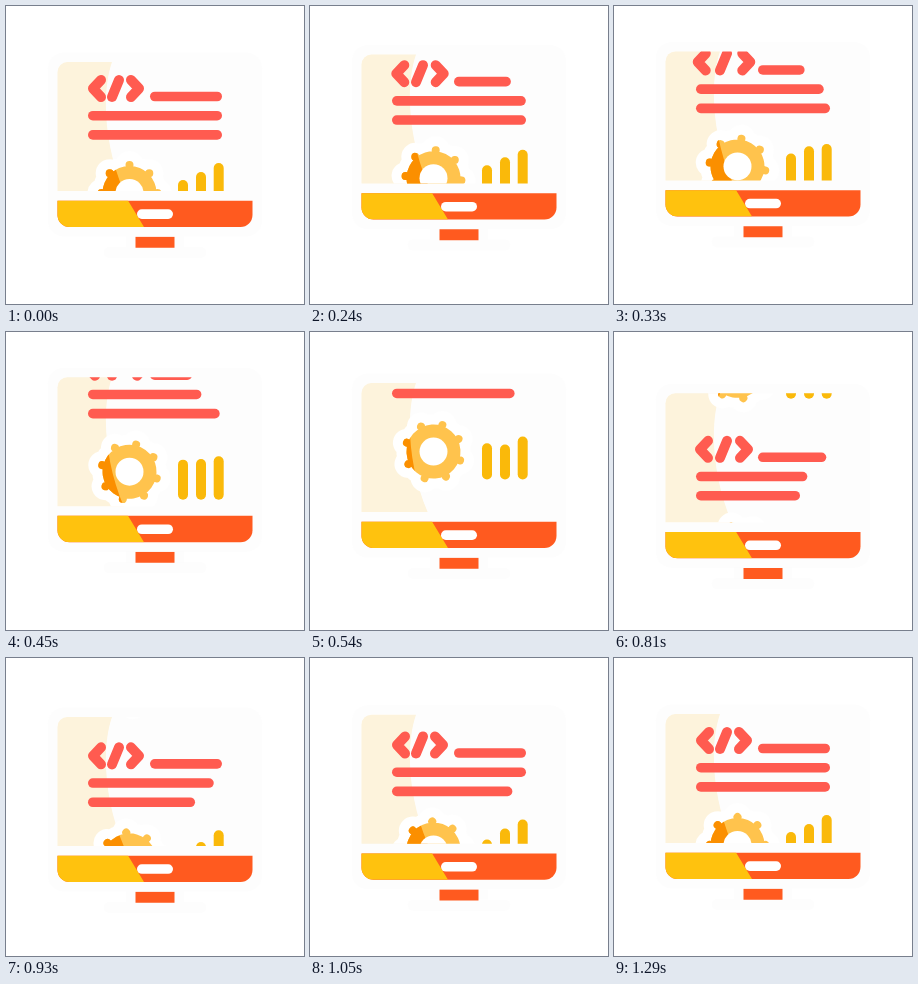
Recreate the animation shown at these times as an HTML page with a canvas. Size 298 by 298 pixels, loop 1470 ms.

```html
<!DOCTYPE html>
<html>
<head>
<meta charset="utf-8">
<style>
html, body { margin: 0; width: 100%; height: 100%; overflow: hidden; background: #fff; }
canvas { display: block; width: 298px; height: 298px; }
</style>
</head>
<body>
<canvas id="stage"></canvas>
<script>
const LOOP = 1470, SCROLL = 183;
const canvas = document.getElementById('stage');
const ctx = canvas.getContext('2d');
const ratio = window.devicePixelRatio || 1;
canvas.width = canvas.height = 298 * ratio;

const FRAME = '#fdfdfd', CREAM = '#fdf3dc', YELLOW = '#ffc20e', ORANGE = '#ff5a1f';
const RED = '#ff5b50', GOLD = '#ffc34d', DARK_GOLD = '#fb8f00', AMBER = '#fab90a';

// 0 to 1 with soft ends, from time a to time b
function ramp(t, a, b) {
  const u = Math.min(1, Math.max(0, (t - a) / (b - a)));
  return u * u * (3 - 2 * u);
}

// 0 to 1 and back again
const pulse = (t, up, down, length) => ramp(t, up, up + length) - ramp(t, down, down + length);

// cubic-bezier(.64, 0, .36, 1)
function easeInOut(x) {
  let lo = 0, hi = 1, s = 0.5;
  for (let i = 0; i < 20; i++) {
    s = (lo + hi) / 2;
    const r = 1 - s;
    if (1.92 * s * r * r + 1.08 * s * s * r + s * s * s < x) lo = s; else hi = s;
  }
  return s * s * (3 - 2 * s);
}

function box(x, y, w, h, radius, color) {
  ctx.fillStyle = color;
  ctx.beginPath();
  ctx.roundRect(x, y, w, h, radius);
  ctx.fill();
}

function stroke(...points) {
  ctx.beginPath();
  points.forEach(([x, y]) => ctx.lineTo(x, y));
  ctx.stroke();
}

const screen = new Path2D();
screen.roundRect(51.5, 56, 195, 129, [10, 10, 0, 0]);
const shade = new Path2D('M40 40H112L106 56C95 88 98 145 122 194.5L138 221H40Z');

const gear = new Path2D();
gear.arc(0, 0, 27, 0, 2 * Math.PI);
for (let i = 0; i < 8; i++) {
  const a = i * Math.PI / 4, x = 28 * Math.cos(a), y = 28 * Math.sin(a);
  gear.moveTo(x + 4, y);
  gear.arc(x, y, 4, 0, 2 * Math.PI);
}

function drawGear(t, y) {
  const placed = new Path2D();
  const angle = 45 * ramp(t, 0, 1230);
  placed.addPath(gear, new DOMMatrix().translate(123.5, y).rotate(angle));
  ctx.strokeStyle = '#fff';
  ctx.lineWidth = 20;
  ctx.stroke(placed);
  ctx.fillStyle = GOLD;
  ctx.fill(placed);
  ctx.save();
  ctx.clip(shade);
  ctx.fillStyle = DARK_GOLD;
  ctx.fill(placed);
  ctx.restore();
  box(109.5, y - 14, 28, 28, 14, '#fff');
}

function drawBars(t, y) {
  const bars = [[172, 41, 10, 395, 860], [190, 49, 15, 290, 710], [207.7, 58, 15, 180, 560]];
  for (const [x, full, shrink, up, down] of bars) {
    const h = full - shrink * pulse(t, up, down, 300);
    box(x, y - h, 10, h, 5, AMBER);
  }
}

function drawCode(t, y) {
  const spread = 6 * pulse(t, 180, 600, 285);
  ctx.strokeStyle = RED;
  ctx.lineWidth = 10;
  stroke([95 - spread, y - 8.5], [87 - spread, y], [95 - spread, y + 8.5]);
  stroke([106, y + 8.5], [113, y - 8.5]);
  stroke([125 + spread, y - 8.5], [133 + spread, y], [125 + spread, y + 8.5]);
  [144, 82, 82].forEach((x, i) => {
    const end = 216 - 30 * pulse(t, 60 + 165 * i, 530 + 165 * i, 360);
    box(x, y + 3.2 + 19.2 * i, end - x, 9.6, 4.8, RED);
  });
}

function drawScreen(t) {
  ctx.save();
  ctx.clip(screen);
  ctx.fillStyle = CREAM;
  ctx.fill(shade);
  const scroll = SCROLL * easeInOut(Math.min(1, t / 1230));
  for (const shift of [-scroll, SCROLL - scroll]) {
    drawGear(t, 187 + shift);
    drawBars(t, 215 + shift);
    drawCode(t, 82.5 + shift);
  }
  ctx.restore();
}

function drawMonitor() {
  box(120, 225, 58, 20, 0, FRAME);
  box(98, 241, 102, 11, 5, FRAME);
  box(129.5, 230.7, 39, 11, 0, ORANGE);
  box(42, 46.5, 214, 184, 16, FRAME);
  const corners = [0, 0, 12, 12];
  box(51.5, 194.7, 195, 26.3, corners, ORANGE);
  ctx.save();
  ctx.clip(shade);
  box(51.5, 194.7, 195, 26.3, corners, YELLOW);
  ctx.restore();
  box(131, 203.3, 36, 9.6, 4.8, '#fff');
}

function draw(now) {
  const t = now % LOOP;
  const bob = -11.7 * ramp(t, 0, 410) + 17.6 * ramp(t, 410, 720) - 5.9 * ramp(t, 720, 1140);
  ctx.setTransform(ratio, 0, 0, ratio, 0, 0);
  ctx.fillStyle = '#fff';
  ctx.fillRect(0, 0, 298, 298);
  ctx.translate(0, bob);
  ctx.lineCap = ctx.lineJoin = 'round';
  drawMonitor();
  drawScreen(t);
}

const start = performance.now();
function tick() {
  draw(performance.now() - start);
  requestAnimationFrame(tick);
}
tick();
</script>
</body>
</html>
```
